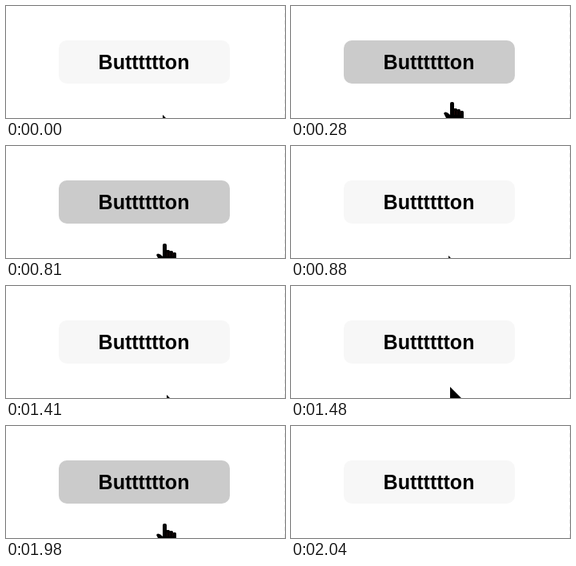
These frames come from a looping animation (349 px wide and 140 px high, 2500 ms). An HTML page with a canvas:

```html
<!DOCTYPE html>
<html lang="en">
<head>
<meta charset="utf-8">
<title>Button hover</title>
<style>
  html, body { margin: 0; width: 100%; height: 100%; overflow: hidden; background: #fff; }
  canvas { display: block; }
</style>
</head>
<body>
<canvas id="stage" width="349" height="140"></canvas>
<script>
const LOOP = 2500;
const STEP = 68;     // the pointer is sampled at this interval, in ms
const HOVER_Y = 125; // the hit area reaches below the button
const ctx = document.getElementById('stage').getContext('2d');

// Rise quickly from the bottom edge, then settle; the hand appears a step late
const enter = (fromX, toX) => k => {
  const rest = Math.exp(-0.94 * k);
  return { x: toX + (fromX - toX) * rest, y: 119.5 + 16.5 * rest, hand: k > 2 };
};

const leave = x => k => {
  const y = 122 + 15 * k;
  return { x: x - k, y, hand: y < HOVER_Y };
};

const gestures = [
  { start: 0, end: 810, move: enter(196, 201) },
  { start: 810, end: 950, move: leave(198) },
  { start: 1410, end: 1980, move: enter(201, 198.3) },
  { start: 1980, end: 2040, move: leave(198) }
];

function box(x, y, w, h, r, fill) {
  ctx.fillStyle = fill;
  ctx.beginPath();
  ctx.roundRect(x, y, w, h, r);
  ctx.fill();
}

function polygon(points) {
  ctx.fillStyle = '#000';
  ctx.beginPath();
  for (const [x, y] of points) ctx.lineTo(x, y);
  ctx.closePath();
  ctx.fill();
}

function drawArrow() {
  polygon([[0, 0], [0, 27], [6, 21], [10, 30], [14, 28], [10, 19], [19, 19]]);
}

function drawHand() {
  box(-2, 0, 5, 20, 2, '#000');
  box(2, 8, 5, 14, 1.5, '#000');
  box(6.5, 9, 4.5, 14, 1.5, '#000');
  box(10.5, 11, 4.5, 14, 1.5, '#000');
  polygon([[-10, 14], [-8, 12.5], [-5, 13.5], [-2, 16], [12, 15], [12, 28], [-2, 28], [-7, 20]]);
  ctx.fillStyle = '#2a0d0d';
  for (const x of [3, 6.5, 10.5]) ctx.fillRect(x, 11, 0.7, 5);
}

function drawPointer({ x, y, hand }) {
  ctx.save();
  ctx.translate(Math.round(x), Math.round(y));
  if (hand) drawHand();
  else drawArrow();
  ctx.restore();
}

function drawButton(hover) {
  box(66, 43, 214, 54, 10, hover ? '#cbcbcb' : '#f7f7f7');
  ctx.fillStyle = '#000';
  ctx.font = 'bold 25px Arial, "Liberation Sans", sans-serif';
  ctx.textAlign = 'center';
  ctx.fillText('Butttttton', 172.5, 79);
}

function drawDivider() {
  ctx.strokeStyle = '#ececec';
  ctx.lineWidth = 1;
  ctx.setLineDash([5, 4]);
  ctx.beginPath();
  ctx.moveTo(348.5, 0);
  ctx.lineTo(348.5, 140);
  ctx.stroke();
}

function draw(now) {
  const t = now % LOOP;
  const gesture = gestures.find(g => t >= g.start && t < g.end);
  const pointer = gesture && gesture.move(Math.floor((t - gesture.start) / STEP));
  ctx.fillStyle = '#fff';
  ctx.fillRect(0, 0, 349, 140);
  drawDivider();
  drawButton(pointer && pointer.y < HOVER_Y);
  if (pointer) drawPointer(pointer);
}

function tick() {
  draw(performance.now());
  requestAnimationFrame(tick);
}
tick();
</script>
</body>
</html>
```
